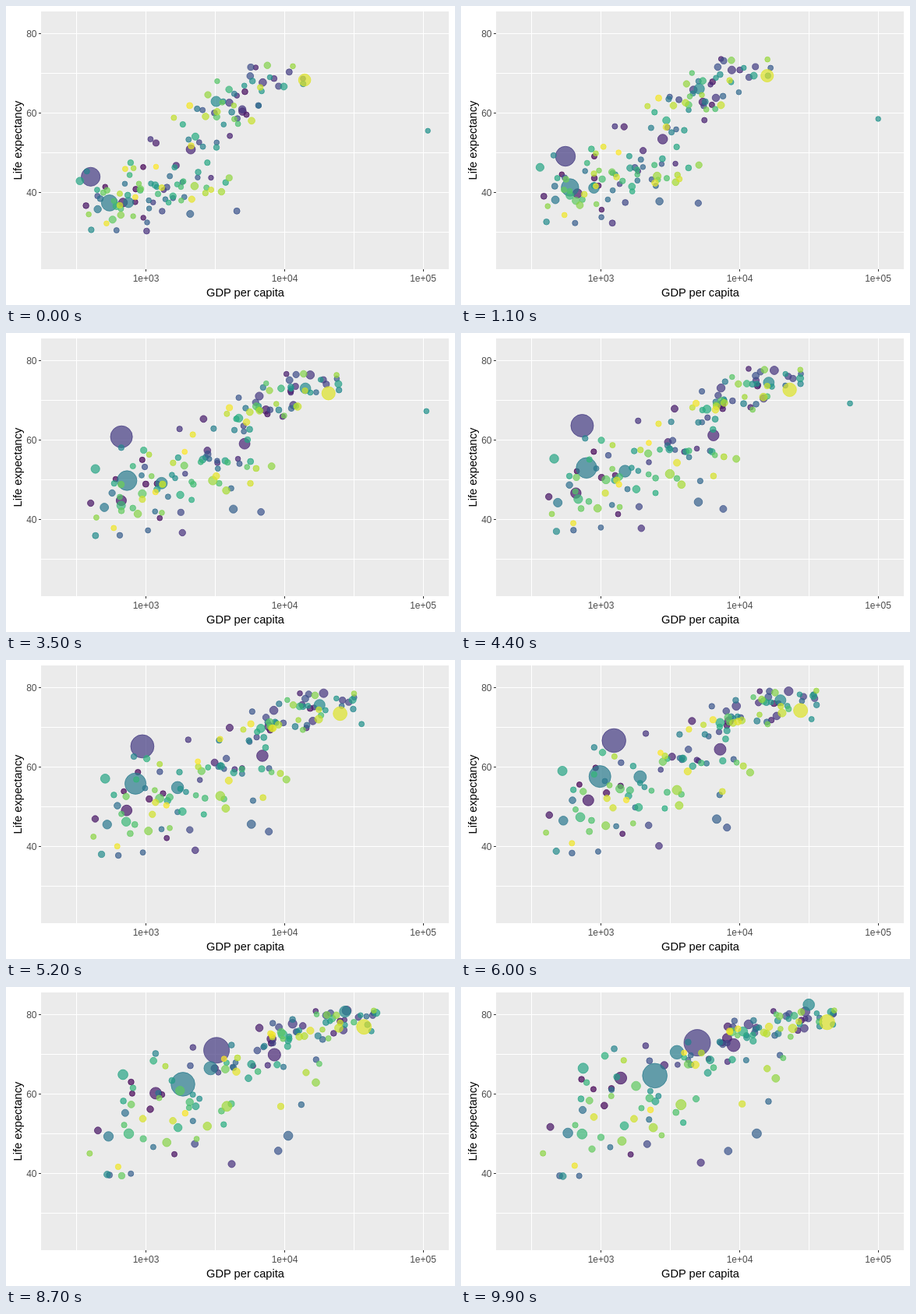
Recreate the animation shown at these times as an HTML page. Size 576 px wide and 384 px high, loop 10 s.

```html
<!DOCTYPE html>
<html lang="en">
<head>
<meta charset="utf-8">
<title>Life expectancy and GDP per capita</title>
<style>
html, body { margin: 0; width: 100%; height: 100%; overflow: hidden; background: #fff; }
svg { display: block; width: 576px; height: 384px; font-family: "Liberation Sans", Arial, sans-serif; }
</style>
</head>
<body>
<svg viewBox="0 0 576 384">
  <clipPath id="panel"><rect x="45" y="7" width="523" height="331"/></clipPath>
  <rect x="45" y="7" width="523" height="331" fill="#ebebeb"/>
  <path d="M90.5 7v331M268.5 7v331M446.5 7v331M179.5 7v331M357.5 7v331M535.5 7v331
    M45 86.5h523M45 188.5h523M45 290.5h523M45 35.5h523M45 137.5h523M45 239.5h523" stroke="#fff"/>
  <g id="dots" clip-path="url(#panel)" fill-opacity=".7" stroke-opacity=".7"/>
  <path d="M179.5 338v3M357.5 338v3M535.5 338v3M42 35.5h3M42 137.5h3M42 239.5h3" stroke="#333"/>
  <g font-size="12" fill="#4d4d4d" text-anchor="end">
    <text x="39.5" y="40">80</text><text x="39.5" y="142">60</text><text x="39.5" y="244">40</text>
  </g>
  <g font-size="12" fill="#4d4d4d" text-anchor="middle">
    <text x="179.5" y="354">1e+03</text><text x="357.5" y="354">1e+04</text><text x="535" y="354">1e+05</text>
  </g>
  <g font-size="14.67" text-anchor="middle">
    <text x="307" y="373">GDP per capita</text>
    <text transform="translate(19.5 172.5) rotate(-90)">Life expectancy</text>
  </g>
</svg>
<script>
const TOTAL = 142, STATES = 12, FRAMES = 100, FRAME_MS = 100, FRAMES_PER_STATE = 9;

// Leading countries: colour rank, population range (millions), keys of [state, income, life]
const leaders = [
  { rank: 24, pop: [556, 1319], keys: [[0, 400, 44], [1, 576, 50.5], [2, 488, 44.5], [3, 613, 58.4],
    [5, 741, 64], [7, 1379, 67.3], [11, 4959, 73]] },
  { rank: 58, pop: [372, 1110], keys: [[0, 547, 37.4], [6, 856, 56.6], [11, 2452, 64.7]] },
  { rank: 134, pop: [157, 301], keys: [[0, 13990, 68.4], [11, 42952, 78.2]] },
  { rank: 71, pop: [.2, 2.5], keys: [[0, 108382, 55.6], [2, 95458, 60.5], [3, 80895, 64.6],
    [4, 109348, 67.7], [6, 31354, 71.3], [11, 47307, 77.6]] },
  { rank: 107, pop: [2.5, 8.9], keys: [[0, 493, 40], [7, 848, 44], [8, 737, 23.6], [9, 590, 36.1], [11, 863, 46.2]] },
  { rank: 66, pop: [86, 127], keys: [[0, 3217, 63], [4, 14779, 73.4], [11, 31656, 82.6]] },
  { rank: 59, pop: [82, 223], keys: [[0, 750, 37.5], [11, 3541, 70.6]] },
  { rank: 14, pop: [57, 190], keys: [[0, 2109, 50.9], [5, 6660, 61.5], [11, 9066, 72.4]] },
  { rank: 8, pop: [47, 150], keys: [[0, 684, 37.5], [5, 660, 46.9], [11, 1391, 64.1]] }
];

// Everyone else: regional mean and spread of log income and life expectancy, first to last state
const regions = [
  { n: 51, corr: .45, skew: .12, growth: 3.7, income: [2.99, 3.24], incomeSpread: [.27, .41], life: [39, 54.8], lifeSpread: [5, 9] },
  { n: 23, corr: .7, skew: 0, growth: 2.6, income: [3.5, 3.92], incomeSpread: [.22, .27], life: [53, 73.6], lifeSpread: [9, 3.6] },
  { n: 27, corr: .75, skew: 0, growth: 3.2, income: [3.2, 3.88], incomeSpread: [.32, .45], life: [47, 71.5], lifeSpread: [9, 6] },
  { n: 32, corr: .8, skew: 0, growth: 1.3, income: [3.7, 4.36], incomeSpread: [.24, .22], life: [65, 78], lifeSpread: [5, 2.6] }
];

const mix = (a, b, t) => a + (b - a) * t;
const clamp = (v, lo, hi) => Math.min(hi, Math.max(lo, v));

let seed = 1952;
function random() {
  seed = seed + 0x6D2B79F5 | 0;
  let t = Math.imul(seed ^ seed >>> 15, 1 | seed);
  t = t + Math.imul(t ^ t >>> 7, 61 | t) ^ t;
  return ((t ^ t >>> 14) >>> 0) / 4294967296;
}

function shuffle(list) {
  for (let i = list.length - 1; i > 0; i--) {
    const j = Math.floor(random() * (i + 1));
    [list[i], list[j]] = [list[j], list[i]];
  }
  return list;
}

// Evenly spread, bounded scores with unit deviation, in random order
const scores = n => shuffle(Array.from({ length: n }, (_, i) => {
  const s = (2 * i + 1) / n - 1;
  return (s + s ** 3) / .936;
}));

const countries = [];

// pointAt(state, t) gives [log income, life, population]
function addCountry(rank, pointAt) {
  const points = Array.from({ length: STATES }, (_, k) => pointAt(k, k / (STATES - 1)));
  countries.push({ rank, points });
}

for (const { rank, pop, keys } of leaders)
  addCountry(rank, (k, t) => {
    const i = Math.max(1, keys.findIndex(key => key[0] >= k));
    const [k0, income0, life0] = keys[i - 1], [k1, income1, life1] = keys[i];
    const u = (k - k0) / (k1 - k0);
    return [mix(Math.log10(income0), Math.log10(income1), u), mix(life0, life1, u), mix(...pop, t)];
  });

const taken = new Set(leaders.map(c => c.rank));
const free = shuffle([...Array(TOTAL).keys()].filter(i => !taken.has(i)));

for (const r of regions) {
  const xs = scores(r.n), ys = scores(r.n), drift = scores(r.n);
  for (let i = 0; i < r.n; i++) {
    const pop = .4 * 60 ** (random() ** 1.2);
    addCountry(free.pop(), (k, t) => {
      const eased = 1 - (1 - t) ** 1.6, turn = .6 * t;
      const zx = clamp(xs[i] * Math.cos(turn) + drift[i] * Math.sin(turn), -2, 2.1);
      const zy = clamp(r.corr * zx + Math.sqrt(1 - r.corr ** 2) * ys[i], -1.7, 2.1);
      const x = mix(...r.income, eased) + mix(...r.incomeSpread, t) * (zx + r.skew * (zx * zx - 1));
      const y = mix(...r.life, eased) + mix(...r.lifeSpread, t) * zy;
      return [
        Math.min(x, mix(4.13, 4.66, eased)) + (random() - .5) * .05,
        Math.min(y, mix(72, 81.5, eased)) + (random() - .5) * .7,
        pop * mix(1, r.growth, t)
      ];
    });
  }
}

const stops = ["440154", "472d7b", "3b528b", "2c728e", "21918c", "28ae80", "5ec962", "addc30", "fde725"]
  .map(s => [0, 2, 4].map(i => parseInt(s.slice(i, i + 2), 16)));

function viridis(t) {
  const p = t * (stops.length - 1), i = Math.min(Math.floor(p), stops.length - 2);
  return `rgb(${stops[i].map((c, j) => Math.round(mix(c, stops[i + 1][j], p - i)))})`;
}

const layer = document.getElementById("dots");
countries.sort((a, b) => a.rank - b.rank);
for (const c of countries) {
  c.dot = document.createElementNS("http://www.w3.org/2000/svg", "circle");
  const color = viridis(c.rank / (TOTAL - 1));
  c.dot.setAttribute("fill", color);
  c.dot.setAttribute("stroke", color);
  layer.append(c.dot);
}

function draw(now) {
  const pos = Math.floor(now / FRAME_MS) % FRAMES / FRAMES_PER_STATE;
  const k = Math.min(Math.floor(pos), STATES - 2);
  for (const { points, dot } of countries) {
    const [logIncome, life, pop] = points[k].map((v, i) => mix(v, points[k + 1][i], pos - k));
    dot.setAttribute("cx", 179.4 + 177.8 * (logIncome - 3));
    dot.setAttribute("cy", 443.4 - 5.093 * life);
    dot.setAttribute("r", 3 + 14 * Math.sqrt(pop / 1319));
  }
  requestAnimationFrame(draw);
}
draw(performance.now());
</script>
</body>
</html>
```
